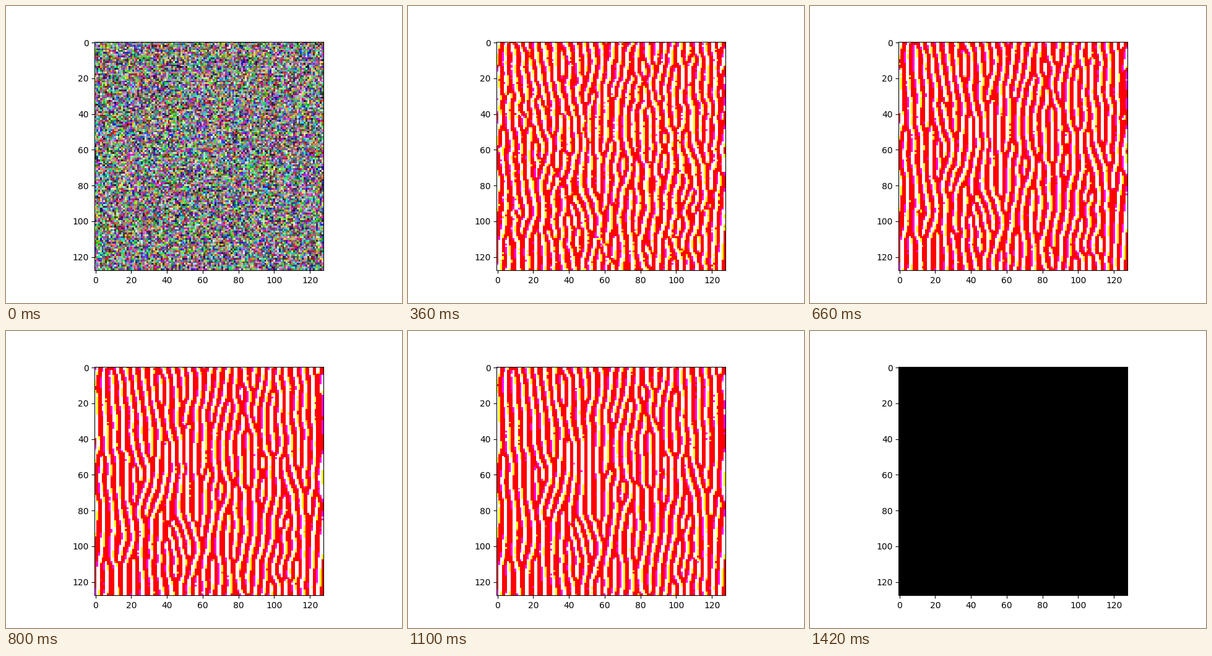
A matplotlib script that plays this animation: 640 px wide and 480 px high, repeating every 2020 ms.

```python
import numpy as np
import matplotlib.pyplot as plt
from matplotlib.animation import FuncAnimation

SIZE = 128
FRAMES = 101          # 20 ms each
BLACKOUT = 71         # frame at which the grid goes black
PERIOD = 4.75         # stripe spacing in cells
SHIFT = 0.33          # phase offset between green and blue


def stripe_filter(phase):
    """Spectrum of a small vertical-stripe kernel with no constant part."""
    d = (np.arange(SIZE) + SIZE // 2) % SIZE - SIZE // 2
    x, y = np.meshgrid(d, d)
    envelope = np.exp(-x**2 / (2 * 1.7**2) - y**2 / (2 * 1.15**2))
    kernel = envelope * np.cos(2 * np.pi * x / PERIOD - phase)
    kernel -= envelope * kernel.sum() / envelope.sum()
    return np.fft.fft2(kernel / np.abs(kernel).sum())


def grow(steps):
    """Let random cells organise themselves into stripes."""
    rng = np.random.default_rng(7)
    filters = [stripe_filter(SHIFT), stripe_filter(-SHIFT)]
    state = rng.random((SIZE, SIZE, 3))
    history = [state.copy()]
    for step in range(1, steps):
        gain = 4 + 3 * step
        settle = min(1, step / 25)
        noise = 0.11 - 0.06 * settle
        biases = (0.03 + 0.06 * settle, 0.08 + 0.01 * settle)
        spectrum = np.fft.fft2(state[..., 1:].mean(axis=2))
        awake = rng.random((SIZE, SIZE)) < 0.5
        state[..., 0] += 0.25 * awake
        for channel in (1, 2):
            filt, bias = filters[channel - 1], biases[channel - 1]
            drive = np.fft.ifft2(spectrum * filt).real - bias
            drive += rng.normal(0, noise, drive.shape)
            state[..., channel] += awake * gain * drive
        state = np.clip(state, 0, 1)
        history.append(state.copy())
    return history


history = grow(BLACKOUT - 1)
black = np.zeros((SIZE, SIZE, 3))

fig, ax = plt.subplots(figsize=(6.4, 4.8), dpi=100)
image = ax.imshow(history[0], interpolation="nearest")


def update(i):
    image.set_data(black if i >= BLACKOUT else history[max(0, i - 1)])
    return [image]


anim = FuncAnimation(fig, update, frames=FRAMES, interval=20,
                     repeat=True, repeat_delay=0, blit=False)
plt.show()
```
